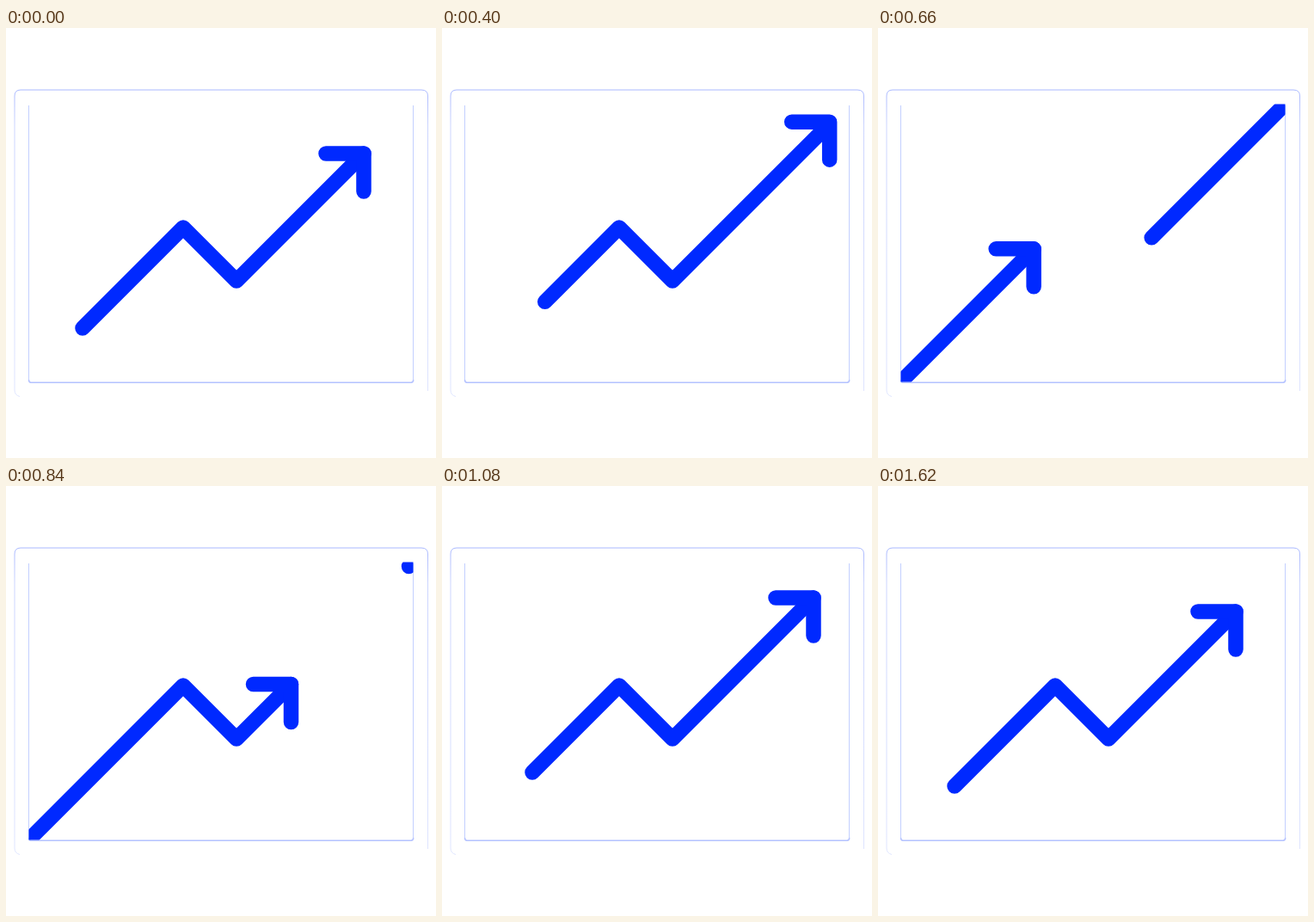
Recreate the animation shown at these times as an HTML page. Size 500x500 px, loop 1660 ms.

```html
<!DOCTYPE html>
<html lang="en">
<head>
<meta charset="utf-8">
<title>Rising trend</title>
<style>
  /* --u: horizontal travel of the arrow; every leg runs at 45 degrees */
  @property --u {
    syntax: "<number>";
    inherits: true;
    initial-value: 0;
  }
  html, body {
    margin: 0;
    width: 100%;
    height: 100%;
    overflow: hidden;
    background: #fff;
  }
  svg {
    display: block;
    width: 100vw;
    height: 100vh;
    animation: travel 1660ms infinite;
  }
  .frame { fill: none; }
  .trend {
    fill: none;
    stroke: #0029ff;
    stroke-width: 17.5;
    stroke-linecap: round;
    stroke-linejoin: round;
  }
  .line {
    stroke-dasharray: 327 137;
    stroke-dashoffset: calc((var(--u) + 45) * -1px);
  }
  .leaving {
    transform: translate(calc(416px + var(--u) * 1.13px), calc(146px - var(--u) * 1.2px));
  }
  .entering {
    offset-path: path("M-420 858L206 232L268 294L800 -238");
    offset-rotate: 0deg;
    offset-distance: calc((var(--u) + 372) * 1.414214px);
  }
  @keyframes travel {
    0% { --u: 0; animation-timing-function: cubic-bezier(.333, 0, .667, 1); }
    15.06% { --u: -12; animation-timing-function: cubic-bezier(.333, 0, .667, 1); }
    65.24% { --u: 480; animation-timing-function: cubic-bezier(.25, 0, .25, 1); }
    97.6%, 100% { --u: 464; }
  }
</style>
</head>
<body>
<svg viewBox="0 0 500 500">
  <defs>
    <clipPath id="window"><rect x="26.5" y="88.5" width="447" height="323"/></clipPath>
    <linearGradient id="fade" gradientUnits="userSpaceOnUse" x1="0" y1="71" x2="0" y2="428">
      <stop offset="0" stop-color="#a9b8ff"/>
      <stop offset=".12" stop-color="#ccd5ff"/>
      <stop offset="1" stop-color="#dfe5ff"/>
    </linearGradient>
  </defs>
  <g class="frame">
    <path stroke="url(#fade)" d="M16 428.5Q10 427 10 421V79Q10 72 17 72H483Q490.5 72 490.5 79V422"/>
    <path stroke="#c3cfff" d="M26.5 90V410M473.5 90V410"/>
    <path stroke="#b4c2ff" stroke-width="1.5" d="M26.5 409Q26.5 412.2 29 412.2H471Q473.7 412.2 473.7 409"/>
  </g>
  <g clip-path="url(#window)">
    <g class="trend">
      <path class="line" pathLength="1220" d="M-420 858L206 232L268 294L800 -238"/>
      <path class="leaving" d="M-44 0H0V44"/>
      <path class="entering" d="M-44 0H0V44"/>
    </g>
  </g>
</svg>
</body>
</html>
```
